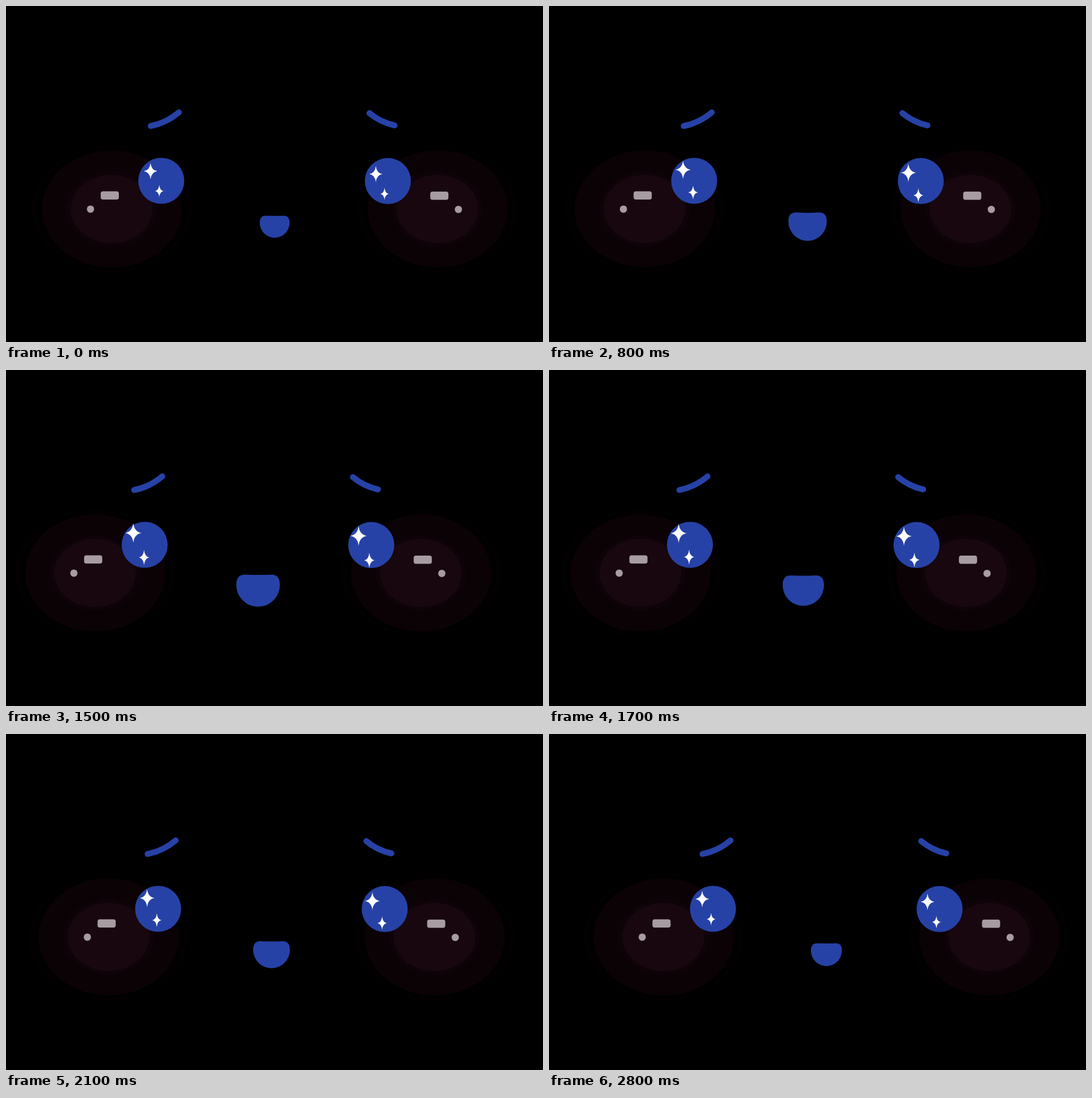
Animation, 947 px wide and 592 px high, one loop 2.9 s. Source, as an HTML page:

```html
<!DOCTYPE html>
<html lang="en">
<head>
<meta charset="utf-8">
<title>Blushing face</title>
<style>
  html, body { margin: 0; height: 100%; overflow: hidden; background: #000; }
  svg { display: block; width: 100vw; height: 100vh; }
  .brow { fill: none; stroke: #2742a6; stroke-width: 10.4; stroke-linecap: round; }
  .blue { fill: #2742a6; }
  .shine { fill: #a69ca2; }
</style>
</head>
<body>
<svg viewBox="0 0 947 592">
  <defs>
    <g id="blush">
      <ellipse rx="142" ry="113" fill="#020001"/>
      <ellipse rx="131" ry="107" fill="#000"/>
      <ellipse rx="123.5" ry="103" fill="#0b0206"/>
      <ellipse cx="-.5" rx="80" ry="66" fill="#0e0308"/>
      <ellipse cx="-.5" rx="72" ry="60" fill="#18070f"/>
    </g>
    <path id="star" fill="#fff" d="M0-1Q.12-.12 1 0Q.12.12 0 1Q-.12.12-1 0Q-.12-.12 0-1Z"/>
    <g id="sparkles">
      <use href="#star" transform="translate(-5 -16.8) scale(11.7 14.2)"/>
      <use href="#star" transform="translate(10.4 18.2) scale(7.3 10.8)"/>
    </g>
  </defs>
  <rect y="588" width="947" height="4" fill="#030001"/>
  <g id="face">
    <use href="#blush" x="186.7" y="357.6"/>
    <use href="#blush" x="761.3" y="357.6"/>
    <g class="shine">
      <rect x="167" y="326.5" width="32" height="14.6" rx="4"/>
      <circle cx="149" cy="357.9" r="6.4"/>
      <rect x="748.2" y="327" width="32" height="14.6" rx="4"/>
      <circle cx="797.8" cy="358.4" r="6.4"/>
    </g>
    <path class="brow" d="M255.3 211.4Q283 206 304.8 187.4"/>
    <path class="brow" d="M641 188.8Q660 204.8 685.2 210.4"/>
    <g class="blue">
      <circle cx="273.8" cy="308" r="40.6"/>
      <circle cx="673.4" cy="308.4" r="40.6"/>
      <path id="mouth" d="M-26.3-7C-26.3-15.5-23-19.8-15-19.5C-6-18.9 6-18.9 15-19.5C23-19.8 26.3-15.5 26.3-7A26.3 26.3 0 0 1-26.3-7Z"/>
    </g>
    <use id="leftSparkles" href="#sparkles"/>
    <use id="rightSparkles" href="#sparkles"/>
  </g>
</svg>
<script>
  const LOOP = 2900, STEP = 100;
  const LEFT = -29.3, RIGHT = 15.4;

  const ease = (t, from, to) => {
    const u = Math.min(1, Math.max(0, (t - from) / (to - from)));
    return u * u * (3 - 2 * u);
  };

  const place = (id, x, y, scale = 1) =>
    document.getElementById(id).setAttribute('transform', `translate(${x} ${y}) scale(${scale})`);

  function draw(now) {
    const t = Math.floor(now % LOOP / STEP) * STEP;
    const sway = LEFT * ease(t, 0, 1400) + (RIGHT - LEFT) * ease(t, 1480, 2670);
    const pulse = t < 1400 ? t / 1400 : Math.abs(2700 - t) / 1300;

    place('face', sway, 0);
    place('mouth', 473.8, 388.9, 1 + pulse / 2);
    place('leftSparkles', 259.9, 307.8, 1 + pulse / 4);
    place('rightSparkles', 657.2, 312.9, 1 + pulse / 4);
  }

  const start = performance.now();
  (function tick() {
    draw(performance.now() - start);
    requestAnimationFrame(tick);
  })();
</script>
</body>
</html>
```
